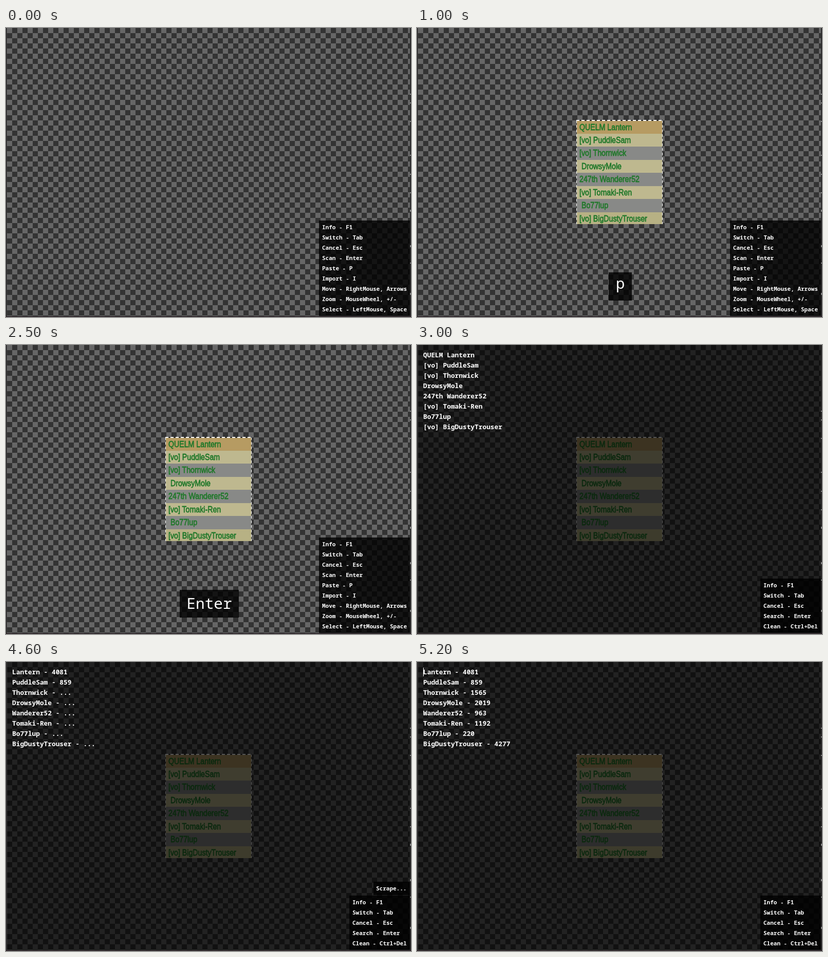
An HTML page for the animation above (6200 ms loop, 788x563 px).

```html
<!DOCTYPE html>
<html lang="en">
<head>
<meta charset="utf-8">
<title>Name scanner</title>
<style>
html, body { margin: 0; width: 100%; height: 100%; overflow: hidden; background: #1e1b1d; }
svg { display: block; width: 100%; height: 100%; }
rect, line { shape-rendering: crispEdges; }
text { fill: #fff; font-family: "Noto Sans Mono", "DejaVu Sans Mono", monospace; font-weight: 600; white-space: pre; }
.legend { font-size: 11px; }
.list { font-size: 12.83px; }
.key { font-size: 29.33px; font-weight: 400; text-anchor: middle; }
.row { font: 16.5px "Liberation Sans", Arial, sans-serif; fill: #20782a; stroke: #20782a; stroke-width: .75px; }
</style>
</head>
<body>
<svg id="stage" viewBox="0 0 788 563">
  <defs>
    <pattern id="checker" x="2" y="0" width="20" height="20" patternUnits="userSpaceOnUse">
      <rect width="20" height="20" fill="#333"/>
      <rect width="10" height="10" fill="#666"/>
      <rect x="10" y="10" width="10" height="10" fill="#666"/>
    </pattern>
  </defs>
</svg>
<script>
const NS = "http://www.w3.org/2000/svg";
const LOOP = 6200;
const stage = document.getElementById("stage");

function add(parent, tag, attrs = {}, content = "") {
  const el = document.createElementNS(NS, tag);
  for (const k in attrs) el.setAttribute(k, attrs[k]);
  el.textContent = content;
  return parent.appendChild(el);
}
const group = () => add(stage, "g");
const box = (g, x, y, width, height, fill) => add(g, "rect", { x, y, width, height, fill });
const label = (g, x, y, cls, str) => add(g, "text", { x, y, class: cls }, str);
const panel = (g, x, y, right, bottom) => box(g, x, y, right - x, bottom - y, "rgba(0,0,0,.8)");
const show = (el, on) => el.setAttribute("visibility", on ? "visible" : "hidden");

const players = [
  ["QUELM ", "Lantern", 4081],
  ["[vo] ", "PuddleSam", 859],
  ["[vo] ", "Thornwick", 1565],
  ["", "DrowsyMole", 2019],
  ["247th ", "Wanderer52", 963],
  ["[vo] ", "Tomaki-Ren", 1192],
  ["", "Bo77lup", 220],
  ["[vo] ", "BigDustyTrouser", 4277]
];

// Window edges with slivers of what lies behind on the right
const frame = group();
box(frame, 0, 561, 788, 2, "#26171f");
box(frame, 1, 0, 1, 562, "#434343");
box(frame, 1, 561, 786, 1, "#434343");
box(frame, 786, 0, 1, 562, "#343434");
for (const y of [128, 145, 181, 247, 284, 320, 354, 423, 457, 516])
  box(frame, 786, y, 2, y % 3 ? 2 : 4, "#8a8a8a");
box(frame, 2, 0, 784, 561, "url(#checker)");

// Pasted table
const table = group();
const pitch = 25.43;
players.forEach(([tag, name], i) => {
  const top = i ? Math.round(180.6 + i * pitch) : 180;
  const bottom = i < 7 ? Math.round(180.6 + (i + 1) * pitch) : 382;
  const fill = i === 0 ? "#b69b62" : i === 7 ? "#b7b184" : i % 2 ? "#beb88f" : "#888987";
  box(table, 310, top, 168, bottom - top, fill);
  const t = label(table, 0, 0, "row", tag + name);
  t.setAttribute("transform", `translate(${tag ? 316 : 320} ${198.6 + i * pitch}) scale(.86 1)`);
});
const edge = (x1, y1, x2, y2, width, color, dash) =>
  add(table, "line", { x1, y1, x2, y2, stroke: color, "stroke-width": width, "stroke-dasharray": dash });
edge(310, 180, 478, 180, 2, "#333", "none");
edge(310, 180, 478, 180, 2, "#fff", "6 4");
for (const x of [310.5, 477.5]) {
  edge(x, 180, x, 382, 1, "#444", "none");
  edge(x, 180, x, 382, 1, "#fff", "5 4");
}

const shade = box(stage, 2, 0, 784, 561, "rgba(0,0,0,.667)");

function legend(x, y, lines) {
  const g = group();
  panel(g, x, y, 786, 561);
  lines.forEach((s, i) => label(g, x + 6, y + 17 + i * 20, "legend", s));
  return g;
}
const scanKeys = legend(609, 375, [
  "Info - F1", "Switch - Tab", "Cancel - Esc", "Scan - Enter", "Paste - P", "Import - I",
  "Move - RightMouse, Arrows", "Zoom - MouseWheel, +/-", "Select - LeftMouse, Space"
]);
const textKeys = legend(668, 455, [
  "Info - F1", "Switch - Tab", "Cancel - Esc", "Search - Enter", "Clean - Ctrl+Del"
]);

const status = group();
panel(status, 715, 428, 786, 454);
label(status, 720, 445, "legend", "Scrape...");

function keycap(x, y, right, baseline, str) {
  const g = group();
  panel(g, x, y, right, 531);
  label(g, (x + right) / 2, baseline, "key", str);
  return g;
}
const pKey = keycap(373, 476, 418, 508, "p");
const enterKey = keycap(338, 477, 453, 514, "Enter");

const lines = players.map((_, i) => label(stage, 12, 24 + i * 20, "list", ""));
const caret = box(stage, 12, 11, 1, 17, "#fff");

function render(t) {
  const within = (a, b) => t >= a && t < b;
  const editing = t >= 3000;
  show(table, t >= 1000);
  show(shade, editing);
  show(scanKeys, !editing);
  show(textKeys, editing);
  show(pKey, within(1000, 1500));
  show(enterKey, within(2500, 3000) || within(4000, 4500));
  show(status, within(4000, 5200));
  show(caret, t >= 4000 && !within(4500, 5000));
  // One count arrives every 100 ms
  const found = t < 4500 ? 0 : Math.floor((t - 4500) / 100) + 1;
  players.forEach(([tag, name, count], i) => {
    const str = !editing ? "" : t < 4000 ? tag + name : `${name} - ${i < found ? count : "..."}`;
    if (lines[i].textContent !== str) lines[i].textContent = str;
  });
}

const start = performance.now();
function tick() {
  render((performance.now() - start) % LOOP);
  requestAnimationFrame(tick);
}
tick();
</script>
</body>
</html>
```
